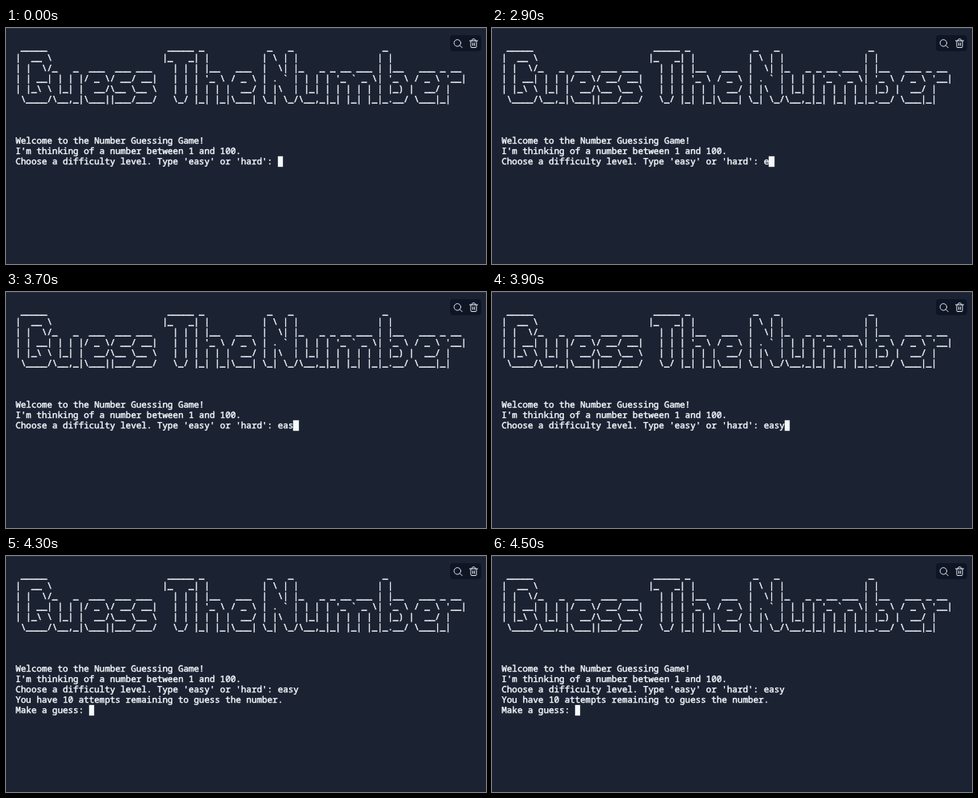
An HTML page that plays this animation: 600 px wide and 296 px high, repeating every 8 s.

```html
<!DOCTYPE html>
<html lang="en">
<head>
<meta charset="utf-8">
<title>Guess The Number</title>
<style>
  html, body { margin: 0; width: 100%; height: 100%; overflow: hidden; background: #1b2333; }
  body { position: relative; box-shadow: inset 0 1px #2b3245; }
  pre {
    position: absolute; left: 12px; top: 18px; margin: 0;
    font: 500 10.93px/13px "Noto Sans Mono", "DejaVu Sans Mono", monospace;
    font-variant-ligatures: none; text-rendering: geometricPrecision;
    color: #f5f9fc; -webkit-text-stroke: .45px #f5f9fc;
  }
  #cursor {
    display: inline-block; width: 1ch; height: 13px; vertical-align: top;
    background: #f5f9fc; box-shadow: 0 0 1px #f5f9fc;
  }
  svg { position: absolute; left: 555px; top: 9px; }
</style>
</head>
<body>
<pre>
 _____                       _____ _            _   _                 _
|  __ \                     |_   _| |          | \ | |               | |
| |  \/_   _  ___  ___ ___    | | | |__   ___  |  \| |_   _ _ __ ___ | |__   ___ _ __
| | __| | | |/ _ \/ __/ __|   | | | '_ \ / _ \ | . ` | | | | '_ ` _ \| '_ \ / _ \ '__|
| |_\ \ |_| |  __/\__ \__ \   | | | | | |  __/ | |\  | |_| | | | | | | |_) |  __/ |
 \____/\__,_|\___||___/___/   \_/ |_| |_|\___| \_| \_/\__,_|_| |_| |_|_.__/ \___|_|



Welcome to the Number Guessing Game!
I'm thinking of a number between 1 and 100.
Choose a difficulty level. Type 'easy' or 'hard': <span id="typed"></span><span id="cursor"></span></pre>
<svg width="39" height="20" fill="none" stroke="#e0e4ea" stroke-linecap="round" stroke-linejoin="round">
  <rect width="39" height="20" rx="4" fill="#0e1525" stroke="none"/>
  <circle cx="9.3" cy="9.8" r="4.2"/>
  <path d="M12.4 12.9l2.8 2.8M24.5 7h10M26 7v7.5q0 1 1 1h5q1 0 1-1V7M27.7 7V5.7q0-.9.9-.9h1.8q.9 0 .9.9V7M28.5 9.8v3.2M30.5 9.8v3.2"/>
</svg>
<script>
  const LOOP = 8000, ENTER = 4300;
  const keyTimes = [2900, 3400, 3700, 3900];
  const reply = "\nYou have 10 attempts remaining to guess the number.\nMake a guess: ";
  const typed = document.getElementById("typed");
  const start = performance.now();

  function draw() {
    const t = Math.max(0, performance.now() - start) % LOOP;
    const count = keyTimes.filter(k => t >= k).length;
    const text = "easy".slice(0, count) + (t >= ENTER ? reply : "");
    if (typed.textContent !== text) typed.textContent = text;
    requestAnimationFrame(draw);
  }
  draw();
</script>
</body>
</html>
```
